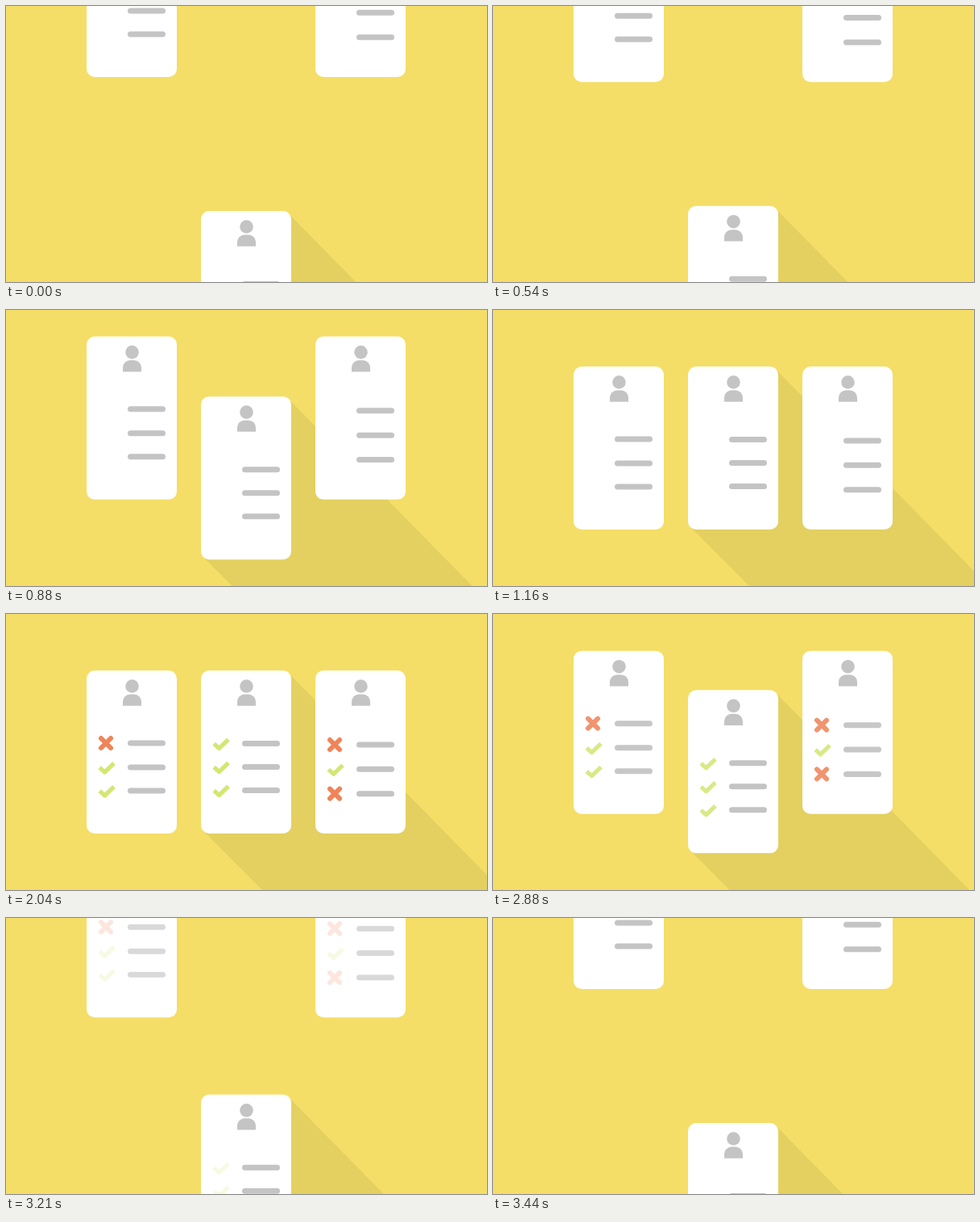
Animation, 597 px wide and 342 px high, one loop 3.96 s. Source, as an HTML page:

```html
<!DOCTYPE html>
<html>
<head>
<meta charset="utf-8">
<style>
  html, body { margin: 0; height: 100%; overflow: hidden; background: #f4de67; }
  svg { display: block; }
</style>
</head>
<body>
<svg id="stage" width="597" height="342" viewBox="0 0 597 342">
  <defs>
    <g id="blank">
      <rect width="112" height="202" rx="10" fill="#fff"/>
      <g fill="#c4c4c4">
        <circle cx="56.5" cy="19.5" r="8.3"/>
        <path d="M45 43.7V38.5a9 9 0 0 1 9-9h5a9 9 0 0 1 9 9v5.2z"/>
      </g>
    </g>
    <path id="line" d="M54.5 0H94.5" stroke="#c4c4c4" stroke-width="7" stroke-linecap="round"/>
    <path id="yes" d="M16.2 .3L22.5 6L34 -5" fill="none" stroke="#d3e774" stroke-width="5.2" stroke-linejoin="round"/>
    <path id="no" d="M18 -6L30 6M30 -6L18 6" stroke="#f08459" stroke-width="6" stroke-linecap="round"/>
  </defs>
</svg>
<script>
const LOOP = 3960, TRAVEL = 184, TOP = 70;
const stage = document.getElementById('stage');

// side: -1 enters from above, 1 from below
const cards = [
  { x: 242, side: 1, rows: [90.5, 119.5, 148.5], marks: ['yes', 'yes', 'yes'] },
  { x: 100, side: -1, rows: [90, 120, 149], marks: ['no', 'yes', 'yes'] },
  { x: 384, side: -1, rows: [92, 122.3, 152.7], marks: ['no', 'yes', 'no'] }
];

const uses = (rows, id) =>
  rows.map((y, i) => `<use href="#${id(i)}" y="${y}"/>`).join('');

for (const card of cards) {
  const g = document.createElementNS('http://www.w3.org/2000/svg', 'g');
  const shadow = card.side > 0
    ? '<path d="M110 4.5L510 410.9L403 599L3 199z" fill="#e3d060"/>' : '';
  g.innerHTML = `${shadow}<use href="#blank"/>
    <g class="lines">${uses(card.rows, () => 'line')}</g>
    <g class="marks">${uses(card.rows, i => card.marks[i])}</g>`;
  card.g = g;
  card.lines = g.querySelector('.lines');
  card.marksLayer = g.querySelector('.marks');
  stage.append(g);
}

// Sine ease-out from 0 to 1
const ease = (t, start, length) =>
  Math.sin(Math.PI / 2 * Math.min(1, Math.max(0, (t - start) / length)));

function draw(now) {
  const t = now % LOOP;
  const enter = ease(t, 528, 600);
  const leave = t < 2840 ? 0 : ease(t, 2827, 640);
  const away = t < 3440 ? TRAVEL * (1 - enter + leave) : TRAVEL;
  const shown = t < 3440 ? ease(t, 1470, 570) * (1 - leave) : 0;
  const lineFade = t < 3440 ? 1 - 0.45 * leave : 1;
  for (const { g, x, side, lines, marksLayer } of cards) {
    g.setAttribute('transform', `translate(${x} ${TOP + side * away})`);
    marksLayer.setAttribute('opacity', shown);
    lines.setAttribute('opacity', side < 0 ? lineFade : 1);
  }
}

const origin = performance.now();
function tick() {
  draw(performance.now() - origin);
  requestAnimationFrame(tick);
}
tick();
</script>
</body>
</html>
```
